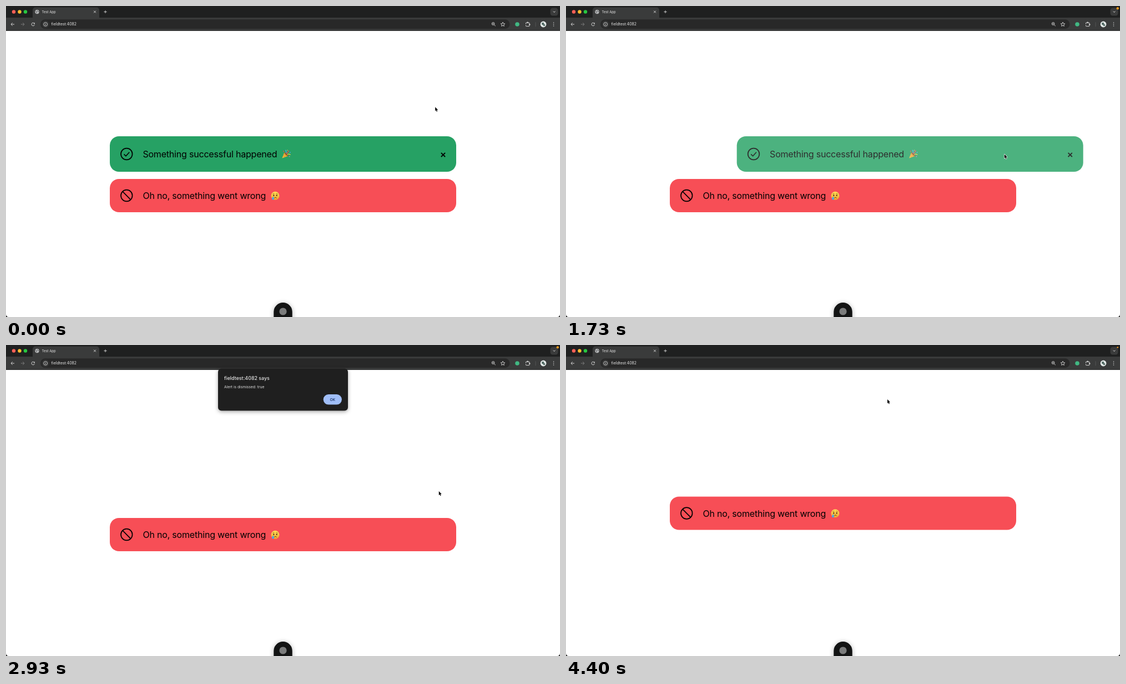
An HTML page with a canvas that plays this animation: 998 px wide and 561 px high, repeating every 5.33 s.

```html
<!DOCTYPE html>
<html lang="en">
<head>
<meta charset="utf-8">
<title>Dismissible alerts</title>
<style>
  html, body { margin: 0; width: 100%; height: 100%; overflow: hidden; background: #fff; }
  canvas { display: block; width: 998px; height: 561px; }
</style>
</head>
<body>
<canvas id="stage"></canvas>
<script>
const W = 998, H = 561, LOOP = 5330, STEP = 200 / 3, STEPS = 80;
const HOST = 'fieldtest:4082';
const GREEN = '#26a164', RED = '#f74e56';
const canvas = document.getElementById('stage');
const ctx = canvas.getContext('2d');
const dpr = window.devicePixelRatio || 1;
canvas.width = W * dpr;
canvas.height = H * dpr;

// Timing helpers
const clamp = v => Math.max(0, Math.min(1, v));
const span = (t, a, b) => clamp((t - a) / (b - a));
const mix = (a, b, p) => a + (b - a) * p;
const smooth = p => p * p * (3 - 2 * p);
const easeIn = p => p * p;
const easeOut = p => 1 - (1 - p) * (1 - p);

// CSS "ease": cubic-bezier(.25, .1, .25, 1)
function cssEase(x) {
  const bez = (a, b, u) => 3 * a * u * (1 - u) ** 2 + 3 * b * u * u * (1 - u) + u ** 3;
  if (x <= 0 || x >= 1) return clamp(x);
  let lo = 0, hi = 1;
  for (let i = 0; i < 24; i++) {
    const mid = (lo + hi) / 2;
    if (bez(.25, .25, mid) < x) lo = mid; else hi = mid;
  }
  return bez(.1, 1, lo);
}

// Drawing helpers
function fillBox(x, y, w, h, r, color) {
  ctx.fillStyle = color;
  ctx.beginPath();
  ctx.roundRect(x, y, w, h, r);
  ctx.fill();
}

function disc(x, y, r, color) {
  ctx.fillStyle = color;
  ctx.beginPath();
  ctx.arc(x, y, r, 0, Math.PI * 2);
  ctx.fill();
}

function ring(x, y, r, color, width) {
  ctx.strokeStyle = color;
  ctx.lineWidth = width;
  ctx.beginPath();
  ctx.arc(x, y, r, 0, Math.PI * 2);
  ctx.stroke();
}

function trace(points) {
  ctx.beginPath();
  for (let i = 0; i < points.length; i += 2) ctx.lineTo(points[i], points[i + 1]);
}

function line(points, color, width) {
  ctx.strokeStyle = color;
  ctx.lineWidth = width;
  trace(points);
  ctx.stroke();
}

function shape(points, color) {
  ctx.fillStyle = color;
  trace(points);
  ctx.closePath();
  ctx.fill();
}

function label(str, x, y, size, color, weight = 400, spacing = 0, align = 'left') {
  ctx.font = `${weight} ${size}px Inter, Roboto, sans-serif`;
  ctx.letterSpacing = spacing + 'px';
  ctx.textAlign = align;
  ctx.fillStyle = color;
  ctx.fillText(str, x, y);
}

function cross(x, y, r, color, width) {
  line([x - r, y - r, x + r, y + r], color, width);
  line([x - r, y + r, x + r, y - r], color, width);
}

function at(x, y, draw) {
  ctx.save();
  ctx.translate(x, y);
  draw();
  ctx.restore();
}

function shadow(color, blur, dy) {
  ctx.shadowColor = color;
  ctx.shadowBlur = blur * dpr;
  ctx.shadowOffsetY = dy * dpr;
}

// Browser window
function drawTabs() {
  fillBox(0, 0, W, 21, 0, '#1f2020');
  ['#ff5f57', '#febc2e', '#28c840'].forEach((c, i) => disc(14 + i * 10.5, 10.5, 3.2, c));
  fillBox(48, 2.5, 120, 20, [5, 5, 0, 0], '#3a3b3b');
  disc(56, 10.5, 3.7, '#b9bbbd');
  line([53.2, 9, 55.4, 10.4, 54.8, 13], '#4a4b4c', 1);
  line([56.2, 7.6, 57, 9.4, 59, 10.4], '#4a4b4c', 1);
  label('Test App', 64.5, 12.7, 6, '#e6e6e6');
  cross(160, 10.5, 1.9, '#e3e3e3', .9);
  line([176.4, 10.5, 181.6, 10.5], '#d5d5d5', .9);
  line([179, 7.9, 179, 13.1], '#d5d5d5', .9);
  fillBox(980.5, 3.5, 14, 14, 4.5, '#3a3b3b');
  line([985.8, 9.6, 987.6, 11.4, 989.4, 9.6], '#e3e3e3', 1);
}

function drawArrow(x, dir, color) {
  line([x - 3 * dir, 33, x + 3 * dir, 33], color, .95);
  line([x + .3 * dir, 30.2, x + 3 * dir, 33, x + .3 * dir, 35.8], color, .95);
}

function drawStar(x, y) {
  const pts = [];
  for (let i = 0; i < 10; i++) {
    const a = -Math.PI / 2 + i * Math.PI / 5, r = i % 2 ? 1.8 : 4;
    pts.push(x + r * Math.cos(a), y + r * Math.sin(a));
  }
  ctx.strokeStyle = '#d6d6d6';
  ctx.lineWidth = .9;
  trace(pts);
  ctx.closePath();
  ctx.stroke();
}

function drawToolbar() {
  const ink = '#d6d6d6';
  fillBox(0, 21, W, 24, 0, '#3a3b3b');
  fillBox(0, 44.2, W, .8, 0, '#292a2a');
  drawArrow(12, -1, ink);
  drawArrow(30, 1, '#808080');

  ctx.strokeStyle = ink;
  ctx.lineWidth = .95;
  ctx.beginPath();
  ctx.arc(48.8, 33, 2.8, .3, 5.5);
  ctx.stroke();
  shape([51.9, 29.7, 51.9, 32.4, 49.2, 32.4], ink);

  fillBox(62, 24.3, 845.5, 17, 8.5, '#282828');
  disc(71.2, 33, 6.4, '#353636');
  ring(71.2, 33, 3.4, ink, .85);
  line([71.2, 32.5, 71.2, 34.9], ink, .9);
  line([71.2, 31, 71.2, 31.8], ink, .9);
  label(HOST, 81.5, 35.4, 6.9, '#e8e8e8');

  ring(877.6, 32, 2.4, ink, .9);
  line([879.4, 33.8, 881.8, 36.2], ink, 1);
  line([876.4, 32, 878.8, 32], ink, .7);
  line([877.6, 30.8, 877.6, 33.2], ink, .7);
  drawStar(895, 33.2);
  disc(921, 33, 3.8, '#41b883');

  ctx.strokeStyle = ink;
  ctx.lineWidth = 1;
  ctx.beginPath();
  ctx.roundRect(936.5, 30.2, 6.4, 6.4, .8);
  ctx.stroke();
  disc(939.6, 29.8, 1.2, ink);
  disc(943.3, 33.4, 1.2, ink);
  disc(936.5, 33.4, .9, '#3a3b3b');

  fillBox(953.6, 29.2, .8, 8, 0, '#5c5d5d');
  disc(968, 33, 5.4, '#e4e9e8');
  disc(967.2, 32, 2.2, '#4d6660');
  disc(969.4, 34.4, 1.9, '#5c726c');
  for (const y of [30, 33, 36]) disc(986.5, y, .75, ink);
}

function drawDock() {
  ctx.save();
  shadow('rgba(0,0,0,.3)', 9, 1);
  fillBox(482.3, 535, 33.4, 34, [16.7, 16.7, 0, 0], '#131414');
  ctx.restore();
  disc(499, 551, 6.6, '#7b7c7c');
}

function drawCorners() {
  ctx.fillStyle = '#000';
  for (const [x, s] of [[0, 1], [W, -1]]) {
    ctx.beginPath();
    ctx.moveTo(x, H - 5);
    ctx.quadraticCurveTo(x, H, x + 5 * s, H);
    ctx.lineTo(x, H);
    ctx.fill();
  }
}

// Emoji, centred on the origin
function drawPopper() {
  shape([-7.6, 7.6, -3.4, -3.2, 3.4, 3.6], '#f3b93c');
  line([-5.5, 2.6, -2.4, 5.4], '#d98a2b', 1.1);
  line([-4.4, -.4, .4, 4.4], '#d98a2b', 1.1);
  ctx.fillStyle = '#8a5a2a';
  ctx.beginPath();
  ctx.ellipse(0, .2, 4.7, 1.5, Math.PI / 4, 0, Math.PI * 2);
  ctx.fill();
  ctx.strokeStyle = '#e8485f';
  ctx.lineWidth = 1.3;
  ctx.beginPath();
  ctx.moveTo(.4, -.4);
  ctx.bezierCurveTo(1, -4, 4.5, -2.4, 4.2, -6.6);
  ctx.stroke();
  ctx.strokeStyle = '#4aa3e8';
  ctx.beginPath();
  ctx.moveTo(-1, -1.6);
  ctx.quadraticCurveTo(.6, -4.4, -1.6, -7.4);
  ctx.stroke();
  ctx.strokeStyle = '#f5c542';
  ctx.beginPath();
  ctx.moveTo(1.6, 1);
  ctx.quadraticCurveTo(4.2, -.8, 7.4, 1.4);
  ctx.stroke();
  disc(-5, -5, .9, '#e8485f');
  disc(6.8, -3, .9, '#4aa3e8');
  disc(1.8, -6.8, .8, '#f5c542');
  disc(5.6, 4.6, .9, '#c86ad0');
}

function drawCrying() {
  const skin = ctx.createLinearGradient(0, -7.6, 0, 7.6);
  skin.addColorStop(0, '#ffdf5a');
  skin.addColorStop(1, '#f0a530');
  disc(0, 0, 7.5, skin);
  for (const s of [-1, 1]) {
    ctx.fillStyle = '#4b2b12';
    ctx.beginPath();
    ctx.ellipse(2.7 * s, -.5, 1, 1.4, 0, 0, Math.PI * 2);
    ctx.fill();
    line([1.7 * s, -4.2, 4.6 * s, -3], '#8a5a1c', .8);
  }
  ctx.strokeStyle = '#5d3412';
  ctx.lineWidth = 1;
  ctx.beginPath();
  ctx.arc(.3, 5.6, 2.4, Math.PI * 1.15, Math.PI * 1.85);
  ctx.stroke();
  ctx.fillStyle = '#45a8ea';
  ctx.beginPath();
  ctx.moveTo(-3.6, 1.2);
  ctx.bezierCurveTo(-7.6, 5.4, -5.6, 7.4, -3.9, 7.3);
  ctx.bezierCurveTo(-1.4, 7.2, -1.6, 4.4, -3.6, 1.2);
  ctx.fill();
}

// Alerts
function drawSuccess(shift, fade) {
  at(187 + shift, 235, () => {
    fillBox(0, 0, 624, 64, 16.5, GREEN);
    ring(30.3, 32, 10.3, '#000', 1.7);
    line([25.6, 32.4, 28.9, 35.7, 35.2, 28.8], '#000', 1.6);
    label('Something successful happened', 59.4, 38, 16, '#000', 400, -.2);
    at(318, 32, drawPopper);
    cross(600.5, 33.4, 3.6, '#000', 1.8);
    // The page is white, so a white veil equals group opacity
    if (fade > 0) fillBox(-1, -1, 626, 66, 0, `rgba(255,255,255,${fade.toFixed(3)})`);
  });
}

function drawError(y) {
  at(187, y, () => {
    fillBox(0, 0, 624, 60, 16.5, RED);
    ring(30.3, 30, 10.3, '#000', 1.7);
    line([23, 22.7, 37.6, 37.3], '#000', 1.7);
    label('Oh no, something went wrong', 59.4, 36, 16, '#000', 400, -.2);
    at(298, 30.2, drawCrying);
  });
}

// Native dialog: open runs 0..1 and tilts the panel, alpha fades it
function drawDialog(open, alpha, button) {
  const lift = (1 - open) * 16, tilt = lift;
  const top = 42.5 - lift * .5, bottom = 118.4 - lift * 1.15;
  const left = 382, right = 616, r = 6;
  ctx.save();
  ctx.globalAlpha = alpha;
  shadow('rgba(0,0,0,.35)', 7, 2);
  ctx.fillStyle = '#1f1f1f';
  ctx.beginPath();
  ctx.moveTo(499, top);
  ctx.arcTo(right - tilt, top, right, bottom, r);
  ctx.arcTo(right, bottom, 499, bottom, r);
  ctx.arcTo(left, bottom, left + tilt, top, r);
  ctx.arcTo(left + tilt, top, 499, top, r);
  ctx.fill();
  ctx.restore();

  ctx.save();
  ctx.globalAlpha = Math.sqrt(alpha);
  ctx.translate(499, -lift);
  ctx.scale(1 - (1 - open) * .06, 1);
  ctx.translate(-499, 0);
  label(HOST + ' says', 393, 63, 8.9, '#e6e6e6', 500);
  label('Alert is dismissed: true', 393, 78, 6.72, '#e0e0e0');
  fillBox(571.7, 89, 33.2, 18.6, 9.3, button);
  label('OK', 588.3, 100.8, 6.7, '#16305f', 500, 0, 'center');
  ctx.restore();
}

// Pointer
const ARROW = [0, 0, 0, 7.3, 1.6, 5.9, 2.7, 8.5, 3.9, 8, 2.8, 5.5, 5, 5.3];
const LEGS = [
  [266, 800, 773.2, 182.2, 788, 200, easeIn],
  [800, 1400, 788, 200, 789.8, 267.4, smooth],
  [2400, 2466, 789.8, 267.4, 789, 267.2, smooth],
  [2870, 3400, 789, 267.2, 555, 177, smooth],
  [3400, 3867, 555, 177, 579, 98, easeOut]
];

function pointerAt(t) {
  const [t0, t1, x0, y0, x1, y1, ease] = LEGS.filter(l => t >= l[0]).pop() || LEGS[0];
  const p = ease(span(t, t0, t1));
  return { x: mix(x0, x1, p), y: mix(y0, y1, p) };
}

function drawHand() {
  ctx.beginPath();
  ctx.moveTo(-.9, 1.2);
  ctx.quadraticCurveTo(.1, -.2, 1, 1.2);
  ctx.lineTo(1.5, 4);
  ctx.lineTo(4.4, 4.8);
  ctx.quadraticCurveTo(5.4, 5.2, 5, 7);
  ctx.lineTo(4.2, 9.8);
  ctx.lineTo(.4, 9.8);
  ctx.lineTo(-2, 6.4);
  ctx.quadraticCurveTo(-1.8, 5, -.2, 6.2);
  ctx.closePath();
  ctx.fillStyle = '#fff';
  ctx.fill();
  ctx.strokeStyle = '#000';
  ctx.lineWidth = .8;
  ctx.stroke();
}

function drawBeam() {
  line([0, -3.2, 0, 4.2], '#111', .9);
  line([-1.6, -3.8, 0, -3.2, 1.6, -3.8], '#111', .8);
  line([-1.6, 4.8, 0, 4.2, 1.6, 4.8], '#111', .8);
}

function drawArrowPointer() {
  trace(ARROW);
  ctx.closePath();
  ctx.strokeStyle = '#fff';
  ctx.lineWidth = 1.3;
  ctx.stroke();
  ctx.fillStyle = '#000';
  ctx.fill();
}

function drawPointer(pos, shift, success) {
  const inRow = success && pos.y > 257 && pos.y < 279;
  const px = pos.x - shift;
  const look = inRow && px > 780 && px < 795 && pos.y > 261 ? drawHand
    : inRow && px > 246 && px < 514 ? drawBeam
    : drawArrowPointer;
  at(pos.x, pos.y, look);
}

function render(t) {
  ctx.setTransform(dpr, 0, 0, dpr, 0, 0);
  ctx.lineJoin = 'round';
  fillBox(0, 0, W, H, 0, '#fff');
  drawTabs();
  drawToolbar();

  const pos = pointerAt(t);
  const leave = cssEase(span(t, 1662, 2152));
  const shift = 684 * leave;
  const success = t < 2060;
  if (success) drawSuccess(shift, leave);
  drawError(t < 4330 ? 312 : 273.5);
  drawDock();
  drawCorners();

  const alpha = 1 - span(t, 4210, 4360);
  if (t >= 2260 && alpha > 0) {
    const open = span(t, 2200, 2282);
    const hover = pos.x > 571 && pos.x < 605 && pos.y > 89 && pos.y < 108;
    const button = t > 4130 ? '#8ba7d9' : hover ? '#96b2e9' : '#a0bef9';
    drawDialog(open, open * alpha, button);
  }

  const dot = mix(2.2 * span(t, 200, 500), 1.3, span(t, 2900, 3867));
  if (dot > 0) disc(993.8, 4.2, dot, '#f29a1f');
  drawPointer(pos, shift, success);
}

// Motion advances 15 times a second; redraw only when a step begins
const start = performance.now();
let shown = -1;

function tick() {
  const t = (performance.now() - start) % LOOP;
  const step = Math.floor((t + 4) / STEP) % STEPS;
  if (step !== shown) {
    shown = step;
    render(step * STEP);
  }
  requestAnimationFrame(tick);
}

tick();
</script>
</body>
</html>
```
